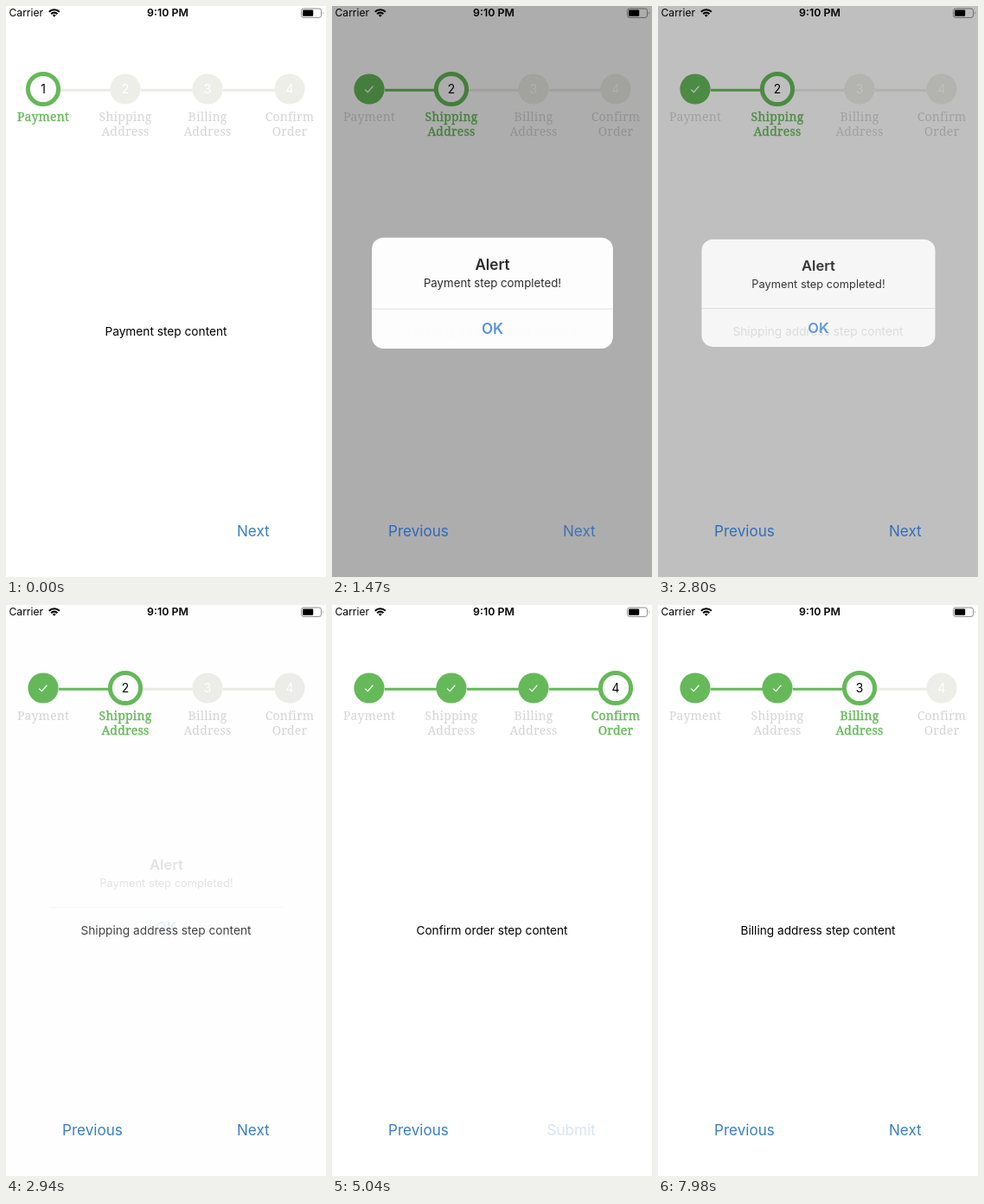
Animation, 370 px wide and 660 px high, one loop 8 s. Source, as an HTML page:

```html
<!DOCTYPE html>
<html lang="en">
<head>
<meta charset="utf-8">
<title>Checkout steps</title>
<style>
  html, body { margin: 0; width: 100%; height: 100%; overflow: hidden; background: #fff; }
  svg { display: block; width: 370px; height: 660px; font-family: Inter, Roboto, sans-serif; }
  .mid { text-anchor: middle; }
  .end { text-anchor: end; }
  .semi { font-weight: 600; }
  .status { font-size: 12.1px; }
  .clock { font-size: 12.4px; }
  .content { font-size: 13.7px; }
  .button { font-size: 17.1px; }
  .number { font-size: 13.8px; fill: #fff; }
  .label { font: 14px "Noto Serif", serif; letter-spacing: .2px; fill: #d5d5d5; }
  .title { font-size: 16.6px; }
  .message { font-size: 12.85px; }
  .line { stroke: #ebebe6; stroke-width: 3; }
  .dot { fill: #eeeee9; }
  .check { display: none; fill: none; stroke: #fff; stroke-width: 1.3; }
  .done .dot { fill: #65b959; }
  .done .line { stroke: #65b959; }
  .done .number { display: none; }
  .done .check { display: block; }
  .active .dot { fill: #fff; stroke: #65b959; stroke-width: 5; }
  .active .number { fill: #000; }
  .active .label { fill: #65b959; stroke: #65b959; stroke-width: .35; }
</style>
</head>
<body>
<svg viewBox="0 0 370 660">
  <rect width="370" height="660" fill="#fff"/>
  <g class="status">
    <text x="3.5" y="12.4">Carrier</text>
    <text class="clock mid semi" x="187" y="12.4">9:10 PM</text>
    <g fill="none" stroke="#000" stroke-width="2.1">
      <path d="M49.8 6.8a8.3 8.3 0 0 1 12 0M52.2 9.2a5 5 0 0 1 7.2 0"/>
      <path d="M53.9 10.7a2.8 2.8 0 0 1 3.8 0l-1.9 2.1z" fill="#000" stroke="none"/>
    </g>
    <rect x="341.5" y="3" width="23" height="10.4" rx="2.6" fill="none" stroke="#8c8c8c"/>
    <rect x="343" y="4.6" width="12.2" height="7.2" rx="1"/>
    <path d="M366 6.4q1.6 1.8 0 3.6z" fill="#8c8c8c"/>
  </g>
  <g id="steps"></g>
  <text id="content" class="content mid" x="185" y="381"></text>
  <rect id="dim" width="370" height="660"/>
  <g id="buttons">
    <text id="previous" class="button" x="65" y="613">Previous</text>
    <text id="next" class="button end" x="304.7" y="613"></text>
  </g>
  <g id="alert">
    <g id="panel">
      <rect x="50.5" y="269.7" width="270" height="124.2" rx="13" fill="#fff"/>
      <path d="M50.5 349.6h270" stroke="#dcdcde" stroke-width=".8"/>
      <path id="press" d="M50.5 350h270v30.9a13 13 0 0 1-13 13h-244a13 13 0 0 1-13-13z" fill-opacity=".08"/>
    </g>
    <g id="alertText" class="mid">
      <text class="title semi" x="185.5" y="305.6">Alert</text>
      <text class="message" x="185.5" y="325.6">Payment step completed!</text>
      <text class="title semi" x="185.5" y="377.8" fill="#3a80d0">OK</text>
    </g>
  </g>
</svg>
<script>
const LOOP = 8000, TICK = 70, DIM = .39;
const steps = [
  { label: ['Payment'], content: 'Payment step content' },
  { label: ['Shipping', 'Address'], content: 'Shipping address step content' },
  { label: ['Billing', 'Address'], content: 'Billing address step content' },
  { label: ['Confirm', 'Order'], content: 'Confirm order step content' }
];
// Each tap: finger down, finger up, resulting step.
const taps = [
  { button: 'next', down: 1060, up: 1292, step: 1 },
  { button: 'next', down: 3780, up: 3780, step: 2 },
  { button: 'next', down: 4800, up: 5040, step: 3 },
  { button: 'previous', down: 6830, up: 7140, step: 2 }
];
const $ = id => document.getElementById(id);

$('steps').innerHTML = steps.map(({ label }, i) => {
  const x = 43 + 95 * i;
  const line = i < 3 ? `<path class="line" d="M${x + 18} 97.2h60"/>` : '';
  const words = label.map((word, row) =>
    `<text class="label mid" x="${x}" y="${133.3 + 16.6 * row}">${word}</text>`).join('');
  return `<g>${line}<circle class="dot" cx="${x}" cy="96" r="17.6"/>
    <text class="number mid" x="${x}" y="101">${i + 1}</text>
    <path class="check" d="M${x - 4.8} 96.6l3.2 3 6-7"/>${words}</g>`;
}).join('');

const clamp = v => Math.min(1, Math.max(0, v));
const easeInOut = v => v < .5 ? 2 * v * v : 1 - 2 * (1 - v) ** 2;

// Critically damped spring from 0 to 1.
function spring(t, start, speed) {
  const s = Math.max(0, t - start) / 1000 * speed;
  return 1 - (1 + s) * Math.exp(-s);
}

function buttonOpacity(t, name) {
  const tap = taps.filter(p => p.button === name && p.down <= t).pop();
  if (!tap) return 1;
  if (t < tap.up) return 1 - .8 * easeInOut(clamp((t - tap.down) / 130));
  return .2 + .8 * easeInOut(clamp((t - tap.up) / 250));
}

function render(t) {
  const tap = taps.filter(p => p.up <= t).pop();
  const current = tap ? tap.step : 0;
  [...$('steps').children].forEach((group, i) => {
    group.setAttribute('class', i < current ? 'done' : i === current ? 'active' : '');
  });
  $('content').textContent = steps[current].content;
  $('next').textContent = current === 3 ? 'Submit' : 'Next';
  $('next').style.opacity = buttonOpacity(t, 'next');
  $('previous').style.opacity = current ? buttonOpacity(t, 'previous') : 0;

  const shown = spring(t, 1292, 18);
  const remaining = 1 - spring(t, 2758, 21);
  const dimmed = shown * (1 - spring(t, 2765, 36));
  const scale = 1.19 - .19 * shown;
  $('dim').style.opacity = DIM * dimmed;
  $('buttons').style.fill = `color-mix(in srgb, #2c64b8 ${100 * dimmed}%, #3880c2)`;
  $('panel').style.opacity = (1 - (1 - shown) ** 2.3) * remaining ** .6;
  $('alertText').style.opacity = shown * remaining;
  $('press').style.opacity = t >= 2590 && t < 2730 ? 1 : 0;
  $('alert').setAttribute('transform',
    `translate(185.5 331.8) scale(${scale}) translate(-185.5 -331.8)`);
}

const origin = performance.now();
function frame() {
  const t = (performance.now() - origin) % LOOP;
  render(Math.floor(t / TICK) * TICK);
  requestAnimationFrame(frame);
}
frame();
</script>
</body>
</html>
```
